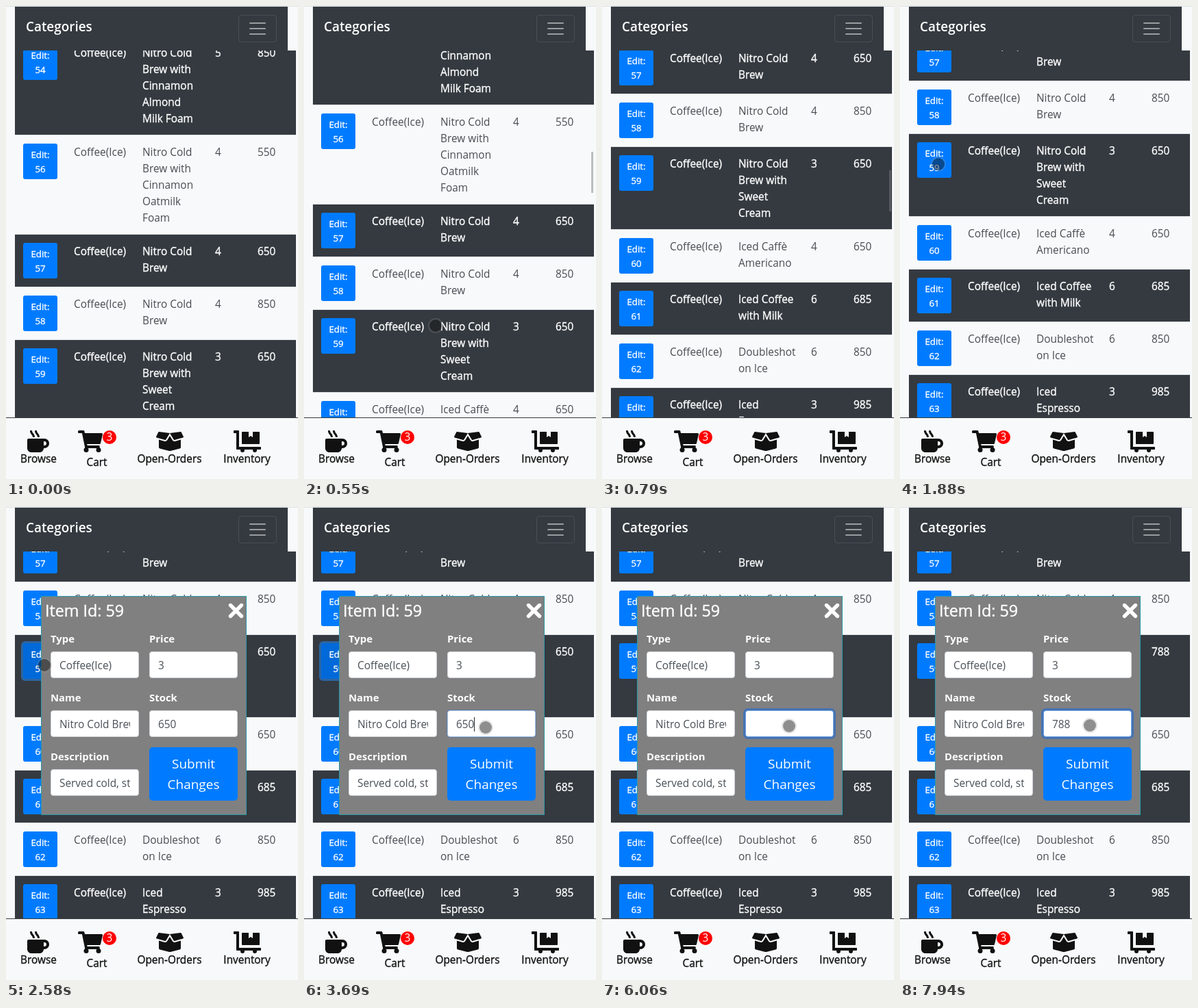
These frames come from a looping animation (426x691 px, 8000 ms). An HTML page:

```html
<!DOCTYPE html>
<html lang="en">
<head>
<meta charset="utf-8">
<title>Inventory</title>
<style>
* { box-sizing: border-box; }
html, body { margin: 0; width: 100%; height: 100%; overflow: hidden; }
body { position: relative; background: #f8f9fa; color: #212529; font: 15.4px/24px "Open Sans", "Noto Sans", sans-serif; }
#stage { position: absolute; left: 0; top: 0; width: 426px; height: 691px; overflow: hidden; border-top: 1px solid #dee2e6; }
#stage > * , .row > *, #modal > * , #nav > * { position: absolute; white-space: pre; }
#stage > * { margin-top: -1px; }
/* medium weight, between regular and semibold */
.dark, .edit, #nav span, #modal h5 { -webkit-text-stroke: .35px currentColor; }

#header { left: 13px; top: 1px; width: 398px; height: 64px; background: #343a40; color: #fff; }
#header b { position: absolute; left: 16px; top: 17px; font-weight: 600; font-size: 18.9px; }
#header svg { position: absolute; left: 326px; top: 12px; }

#view { left: 13px; top: 65px; width: 410px; height: 536px; overflow: hidden; }
#rows { position: absolute; left: 0; top: 0; width: 100%; }
.row { position: absolute; left: 0; width: 100%; border-top: 1px solid #dee2e6; color: #484d52; }
.row.dark { background: #343a40; color: #fff; }
.row > * { top: 13px; }
.row > .edit { top: 12px; }
.edit { left: 12px; width: 50px; height: 52px; padding-top: 6px; border-radius: 3px; background: #007bff; color: #fff; text-align: center; font-size: 13.3px; line-height: 21px; }
.edit.focus { background: #0069d9; box-shadow: 0 0 0 3px rgba(38, 143, 255, .5); }
#bar { left: 419px; width: 3px; height: 60px; background: rgba(128, 128, 128, .5); }

#nav { left: 0; top: 601px; width: 426px; height: 90px; background: #f8f9fa; border-top: 1px solid #343a40; color: #111; font-size: 15.4px; }
#nav span { transform: translateX(-50%); }
#badge { left: 141px; top: 18px; width: 20px; height: 20px; border-radius: 50%; background: #f00; color: #fff; text-align: center; font-size: 15.4px; line-height: 20px; }

#modal { left: 51px; top: 130px; width: 300px; height: 320px; background: #808080; border: 1px solid #2a98a8; color: #fff; }
#modal h5 { margin: 0; left: 5px; top: 5px; font-size: 23.3px; font-weight: 400; line-height: 30px; }
#modal label { font-weight: 700; font-size: 14.9px; }
.field { width: 129px; height: 39px; padding: 8px 12px 0; border: 1px solid #ced4da; border-radius: 4px; background: #fff; color: #495057; }
.field div { height: 24px; overflow: hidden; }
.field.focus { border-color: #6ea2e6; box-shadow: 0 0 0 3px rgba(0, 98, 230, .45); }
.field.half { border-color: #a5c2e6; box-shadow: 0 0 0 1px rgba(0, 98, 230, .2); }
#caret { display: inline-block; width: 1px; height: 21px; background: #222; vertical-align: -5px; }
#submit { left: 157px; top: 220px; width: 129px; height: 78px; padding-top: 9px; border-radius: 5px; background: #007bff; text-align: center; font-size: 19px; line-height: 30px; }
#close { left: 271px; top: 8px; }
#touch { left: -11px; top: -11px; width: 22px; height: 22px; border-radius: 50%; background: rgba(20, 20, 20, .48); border: 2px solid rgba(150, 150, 150, .25); background-clip: padding-box; }
</style>
</head>
<body>
<div id="stage">
  <div id="view"><div id="rows"></div></div>
  <div id="bar"></div>
  <div id="header"><b>Categories</b>
    <svg width="56" height="40" fill="none">
      <rect x=".5" y=".5" width="55" height="39" rx="4" stroke="#fff" stroke-opacity=".1"/>
      <path d="M17 12H39M17 20H39M17 28H39" stroke="#fff" stroke-opacity=".5" stroke-width="2" stroke-linecap="round"/>
    </svg>
  </div>
  <div id="nav">
    <svg width="426" height="90" style="left:0;top:-1px" fill="#111">
      <g transform="translate(31 19) scale(.0625)">
        <path d="M400 192H32c-18 0-32 14-32 32v192c0 53 43 96 96 96h192c53 0 96-43 96-96h16c62 0 112-50 112-112s-50-112-112-112zm0 160h-16v-96h16c27 0 48 21 48 48s-21 48-48 48z"/>
        <path id="steam" d="M127 146c1 8 8 14 16 14h17c10 0 17-8 16-18-4-28-17-54-37-75-14-15-23-33-26-53C112 6 105 0 97 0H80C71 0 63 8 64 18c4 32 18 61 41 84 12 13 19 28 22 44z"/>
        <use href="#steam" x="112"/>
      </g>
      <g transform="translate(105 19)">
        <path d="M0 1.5Q0 0 1.5 0H8Q9 0 9.4 1.2L10 4H34.5Q36.3 4 36 5.8L33 18.8Q32.7 20 31.5 20H13.2L13.6 22H30.4Q32.2 22 31.8 23.8L31.4 26H10.4L5.9 4H1.5Q0 4 0 2.5z"/>
        <circle cx="12" cy="28.5" r="3.5"/><circle cx="30" cy="28.5" r="3.5"/>
      </g>
      <path transform="translate(219 19) scale(.0625)" d="M426 256c-17 0-33-9-42-23L320 126l-64 107c-9 14-25 23-42 23-4 0-9-1-13-2L64 215v178c0 15 10 28 24 31l216 54c10 3 21 3 31 0l217-54c14-4 24-16 24-31V215l-137 39c-4 1-9 2-13 2zM638 144L587 41c-3-6-10-10-17-9L320 64l92 152c4 6 11 9 18 7l198-56c10-3 15-14 10-23zM53 41L2 144c-5 9 0 20 10 23l198 56c7 2 14-1 18-7L320 64 70 32c-7-1-14 3-17 9z"/>
      <g transform="translate(332 19) scale(.0625)">
        <path d="M208 320h384c9 0 16-7 16-16V48c0-9-7-16-16-16H448v128l-48-32-48 32V32H208c-9 0-16 7-16 16v256c0 9 7 16 16 16z"/>
        <path d="M624 384H128V16c0-9-7-16-16-16H16C7 0 0 7 0 16v32c0 9 7 16 16 16h48v368c0 9 7 16 16 16h544c9 0 16-7 16-16v-32c0-9-7-16-16-16z"/>
        <circle cx="208" cy="464" r="48"/><circle cx="496" cy="464" r="48"/>
      </g>
    </svg>
    <span style="left:47.5px;top:48px">Browse</span>
    <span style="left:132.5px;top:53px">Cart</span>
    <span style="left:238.5px;top:48px">Open-Orders</span>
    <span style="left:351.5px;top:48px">Inventory</span>
    <div id="badge">3</div>
  </div>
  <div id="modal">
    <h5>Item Id: 59</h5>
    <svg id="close" width="26" height="26"><path d="M4.5 4.5L20.5 20.5M20.5 4.5L4.5 20.5" stroke="#fff" stroke-width="5.4" stroke-linecap="round"/></svg>
    <div id="submit">Submit
Changes</div>
  </div>
  <div id="touch"></div>
</div>
<script>
const $ = id => document.getElementById(id);
const add = (parent, tag, cls, text, x, y) => {
  const el = parent.appendChild(document.createElement(tag));
  el.className = cls;
  el.textContent = text;
  if (x !== undefined) el.style.left = x + 'px';
  if (y !== undefined) el.style.top = y + 'px';
  return el;
};

const items = [
  [54, 'Nitro Cold\nBrew with\nCinnamon\nAlmond\nMilk Foam', 5, 850],
  [56, 'Nitro Cold\nBrew with\nCinnamon\nOatmilk\nFoam', 4, 550],
  [57, 'Nitro Cold\nBrew', 4, 650],
  [58, 'Nitro Cold\nBrew', 4, 850],
  [59, 'Nitro Cold\nBrew with\nSweet\nCream', 3, 650],
  [60, 'Iced Caffè\nAmericano', 4, 650],
  [61, 'Iced Coffee\nwith Milk', 6, 685],
  [62, 'Doubleshot\non Ice', 6, 850],
  [63, 'Iced\nEspresso', 3, 985]
];
let rowTop = -22, editButton, stockCell;
items.forEach(([id, name, price, stock], i) => {
  const row = add($('rows'), 'div', i % 2 ? 'row' : 'row dark', '', 0, rowTop);
  const lines = name.split('\n').length;
  const height = Math.max(52, lines * 24) + 25;
  row.style.height = height + 'px';
  rowTop += height;
  const button = add(row, 'div', 'edit', `Edit:\n${id}`);
  add(row, 'div', '', 'Coffee(Ice)', 86);
  add(row, 'div', '', name, 186);
  add(row, 'div', '', price, 292);
  const cell = add(row, 'div', '', stock, 354);
  if (id === 59) { editButton = button; stockCell = cell; }
});

const addField = (label, value, col, line) => {
  const x = 13 + col * 144, y = 49 + line * 86;
  add($('modal'), 'label', '', label, x, y);
  const field = add($('modal'), 'div', 'field', '', x, y + 31);
  add(field, 'div', '', value);
  return field;
};
addField('Type', 'Coffee(Ice)', 0, 0);
addField('Price', '3', 1, 0);
addField('Name', 'Nitro Cold Brew with Sweet Cream', 0, 1);
addField('Description', 'Served cold, straight from the tap', 0, 2);
const stockField = addField('Stock', '', 1, 1);
const stockText = add(stockField.firstChild, 'span', '', '');
const caret = add(stockField.firstChild, 'span', '', '');
caret.id = 'caret';

// Each step changes only what it names; the rest carries over.
const steps = [
  [0, { scroll: 0, bar: 0, touch: null, modal: false, button: false, focus: '', caret: false, stock: '650' }],
  [150, { touch: [201, 538] }],
  [550, { scroll: 44, bar: 1, touch: [192, 467] }],
  [670, { scroll: 176, touch: null }],
  [790, { scroll: 282 }],
  [940, { scroll: 301 }],
  [1340, { bar: .5 }],
  [1470, { bar: 0 }],
  [1600, { touch: [56, 228] }],
  [1740, { touch: [56, 230] }],
  [1880, { touch: [56, 231] }],
  [2430, { button: true }],
  [2570, { modal: true }],
  [2850, { touch: [92, 246] }],
  [3000, { touch: [165, 279] }],
  [3140, { touch: [226, 306] }],
  [3280, { touch: [256, 318] }],
  [3420, { touch: [265, 322] }],
  [3690, { focus: 'half', caret: true }],
  [3810, { focus: 'focus', button: false }],
  [4240, { caret: false }],
  [4520, { stock: '65', caret: true, touch: [269, 321] }],
  [4810, { stock: '6', touch: [273, 320] }],
  [4950, { stock: '' }],
  [5080, { caret: false }],
  [5480, { caret: true }],
  [6060, { caret: false }],
  [6340, { stock: '7', caret: true }],
  [6770, { stock: '78' }],
  [7090, { stock: '788' }],
  [7510, { caret: false }],
  [7940, { touch: [277, 319] }]
];

function render(s) {
  $('rows').style.transform = `translateY(${-s.scroll}px)`;
  $('bar').style.opacity = s.bar;
  $('bar').style.top = Math.round(208 + s.scroll * .1134) + 'px';
  $('touch').style.display = s.touch ? '' : 'none';
  if (s.touch) $('touch').style.transform = `translate(${s.touch[0]}px, ${s.touch[1]}px)`;
  $('modal').style.display = s.modal ? '' : 'none';
  editButton.classList.toggle('focus', s.button);
  stockField.className = 'field ' + s.focus;
  caret.style.visibility = s.caret ? 'visible' : 'hidden';
  stockText.textContent = stockCell.textContent = s.stock;
}

const start = performance.now();
let shown = -1;
function tick() {
  const t = (performance.now() - start) % 8000;
  const count = steps.filter(([at]) => at <= t).length;
  if (count !== shown) {
    shown = count;
    render(Object.assign({}, ...steps.slice(0, count).map(step => step[1])));
  }
  requestAnimationFrame(tick);
}
tick();
</script>
</body>
</html>
```
